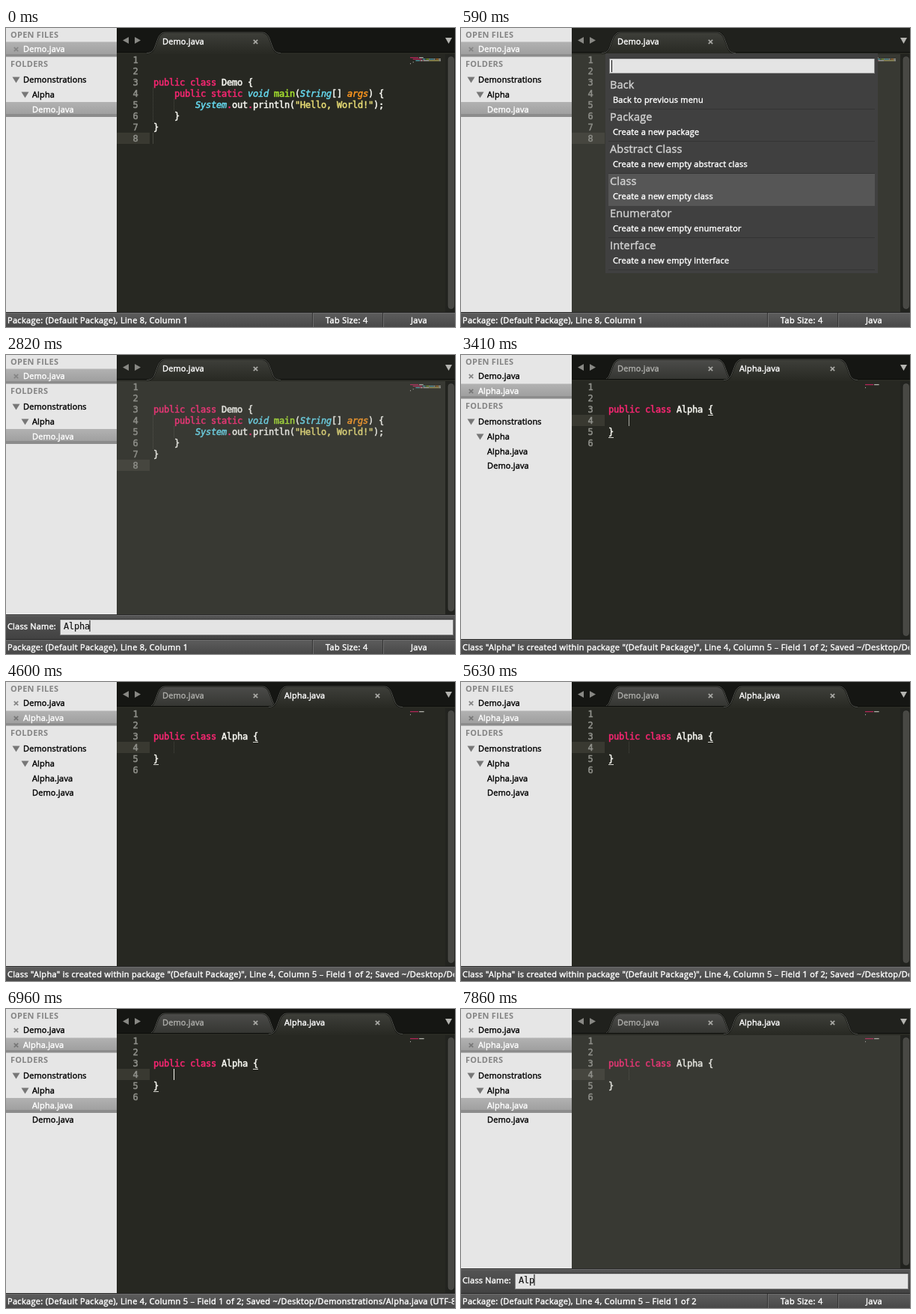
Animation, 600 px wide and 400 px high, one loop 8000 ms. Source, as an HTML page:

```html
<!DOCTYPE html>
<html lang="en">
<head>
<meta charset="utf-8">
<title>Creating a class in an editor</title>
<style>
  html, body { margin: 0; width: 100%; height: 100%; overflow: hidden; background: #272822; }
  svg { display: block; width: 600px; height: 400px; }
  text { white-space: pre; font: 11px "Open Sans", "Noto Sans", sans-serif; letter-spacing: .15px; stroke-width: .42px; }
  .status { letter-spacing: .31px; }
  .desc { letter-spacing: .18px; }
  .head { font-weight: 700; letter-spacing: .25px; stroke-width: 0; }
  .title { font-size: 14.5px; letter-spacing: .17px; }
  .mono { font: 12px "DejaVu Sans Mono", "Liberation Mono", monospace; letter-spacing: -.224px; stroke-width: .15px; }
  .code { stroke-width: .5px; }
  .it { font-style: italic; }
</style>
</head>
<body>
<svg id="stage" viewBox="0 0 600 400" xmlns="http://www.w3.org/2000/svg">
  <defs>
    <linearGradient id="active" x2="0" y2="1">
      <stop stop-color="#3e3f3a"/><stop offset="1" stop-color="#292a24"/>
    </linearGradient>
    <linearGradient id="idle" x2="0" y2="1">
      <stop stop-color="#4c4c4a"/><stop offset="1" stop-color="#343531"/>
    </linearGradient>
    <linearGradient id="row" x2="0" y2="1">
      <stop stop-color="#b2b2b2"/><stop offset=".8" stop-color="#a0a0a0"/>
      <stop offset=".82" stop-color="#8c8c8c"/><stop offset="1" stop-color="#8c8c8c"/>
    </linearGradient>
    <linearGradient id="bar" x2="0" y2="1">
      <stop stop-color="#5e5e5e"/><stop offset="1" stop-color="#484848"/>
    </linearGradient>
    <linearGradient id="panel" x2="0" y2="1">
      <stop stop-color="#545454"/><stop offset="1" stop-color="#434343"/>
    </linearGradient>
    <clipPath id="statusClip"><rect x="0" y="380" width="599" height="20"/></clipPath>
  </defs>
  <g id="scene"></g>
</svg>
<script>
const LOOP = 8000;
const CHAR = 7, LINE = 15, CODE_X = 197, CODE_Y = 35, MINI = .93;

const COLORS = { p: '#f92672', w: '#f8f8f2', c: '#66d9ef', g: '#a6e22e', o: '#fd971f', y: '#e6db74' };

// Each source line is a list of colour:text tokens.
const FILES = {
  Demo: {
    lines: [[], [],
      ['p:public class ', 'w:Demo {'],
      ['w:    ', 'p:public static ', 'c:void ', 'g:main', 'w:(', 'c:String', 'w:[] ', 'o:args', 'w:) {'],
      ['w:        ', 'c:System', 'p:.', 'w:out', 'p:.', 'w:println(', 'y:"Hello, World!"', 'w:);'],
      ['w:    }'], ['w:}'], []],
    guides: [[0, 4, 3], [4, 5, 1]], row: 8, col: 0, marks: []
  },
  Alpha: {
    lines: [[], [], ['p:public class ', 'w:Alpha {'], [], ['w:}'], []],
    guides: [[4, 4, 1]], row: 4, col: 4, marks: [[19, 3], [0, 5]]
  }
};

const MENU = [
  ['Back', 'Back to previous menu'],
  ['Package', 'Create a new package'],
  ['Abstract Class', 'Create a new empty abstract class'],
  ['Class', 'Create a new empty class'],
  ['Enumerator', 'Create a new empty enumerator'],
  ['Interface', 'Create a new empty interface']
];
const FILTERED = [3, 2, 0, 1, 5, 4];

const PACKAGE = 'Package: (Default Package), Line ';
const FIELD = 'Line 4, Column 5 \u2013 Field 1 of 2';
const SAVED = '; Saved ~/Desktop/Demonstrations/Alpha.java (UTF-8)';
const STATUS = {
  demo: PACKAGE + '8, Column 1',
  created: 'Class "Alpha" is created within package "(Default Package)", ' + FIELD + SAVED,
  saved: 'Package: (Default Package), ' + FIELD + SAVED,
  field: 'Package: (Default Package), ' + FIELD
};

// State changes over time; later entries override earlier ones.
const STEPS = [
  [0, { file: 'Demo', focus: true, lit: true, caret: .15, menu: null, input: null,
        inputCaret: 1, status: 'demo', listed: false, selected: 'Demo' }],
  [140, { caret: 0 }],
  [590, { focus: false, lit: false, menu: '' }],
  [1030, { menu: 'c' }],
  [1480, { focus: true, menu: null, caret: 1 }],
  [1630, { focus: false, caret: 0, input: '' }],
  [2070, { input: 'A' }],
  [2220, { input: 'Al' }],
  [2520, { input: 'Alp' }],
  [2670, { input: 'Alph' }],
  [2820, { input: 'Alpha' }],
  [3120, { input: null, file: 'Alpha', focus: true, lit: true, caret: 1, status: 'saved', selected: '' }],
  [3410, { caret: .6, status: 'created', listed: true }],
  [3560, { caret: .2 }],
  [3710, { caret: 0 }],
  [4160, { caret: .5 }],
  [4300, { caret: 1 }],
  [4600, { caret: 0 }],
  [5190, { caret: .4 }],
  [5340, { caret: 1 }],
  [5490, { caret: .5 }],
  [5630, { caret: 0 }],
  [6070, { focus: false, lit: false, menu: '', status: 'saved' }],
  [6520, { menu: 'c' }],
  [6960, { focus: true, lit: true, menu: null, caret: 1, selected: 'Alpha' }],
  [7110, { focus: false, lit: false, caret: 0, input: '', status: 'field' }],
  [7410, { inputCaret: .3 }],
  [7560, { input: 'A', inputCaret: 1 }],
  [7710, { input: 'Al' }],
  [7860, { input: 'Alp' }]
];

const esc = s => s.replace(/&/g, '&amp;').replace(/</g, '&lt;');
const rect = (x, y, w, h, fill, extra = '') =>
  `<rect x="${x}" y="${y}" width="${w}" height="${h}" fill="${fill}" ${extra}/>`;
const text = (x, y, s, fill, cls = '') =>
  `<text x="${x}" y="${y}" fill="${fill}" stroke="${fill}" class="${cls}">${esc(s)}</text>`;
const path = (d, fill, extra = '') => `<path d="${d}" fill="${fill}" ${extra}/>`;
const cross = (x, y, color) =>
  path(`M${x - 2.7} ${y - 2.7}l5.4 5.4m0 -5.4l-5.4 5.4`, 'none', `stroke="${color}" stroke-width="1.7"`);
const code = (x, y, s, fill, cls = '') => text(x, y, s, fill, 'mono code ' + cls);

function tab(x, name, active) {
  const shape = `M${x} 33.5c9 0 10 -6 13 -14c3 -9 5 -13.500 12 -13.500h129c7 0 9 4.500 12 13.500c3 8 4 14 13 14`;
  return path(shape, `url(#${active ? 'active' : 'idle'})`, 'stroke="#0d0e0b" stroke-width="2"') +
    path(shape, 'none', 'stroke="#5c5d58" stroke-width=".9"') +
    text(x + 21, 22, name + '.java', active ? '#fff' : '#adadaa') +
    cross(x + 145.5, 18.5, '#a8a8a4');
}

function tabBar(s) {
  let out = rect(148, 0, 452, 35, s.lit ? '#151613' : '#20211d');
  out += path('M164 12v9l-8 -4.5zM172 12v9l8 -4.5z', '#888884') + path('M587 13h9l-4.5 8z', '#b4b4b0');
  if (s.file === 'Alpha') out += tab(188, 'Demo', false);
  out += rect(148, 32, 452, 1, '#0d0e0b') + rect(148, 33, 452, 2, '#292a24');
  return out + tab(s.file === 'Alpha' ? 351 : 188, s.file, true);
}

function editor(s) {
  const f = FILES[s.file], bottom = s.input === null ? 380 : 347;
  const caretX = CODE_X - 1 + f.col * CHAR, caretY = CODE_Y + (f.row - 1) * LINE;
  let out = rect(148, 35, 452, bottom - 35, '#272822') + rect(148, caretY, 44, LINE, '#393931');
  for (const [col, row, count] of f.guides) {
    const x = CODE_X - .5 + col * CHAR, y = CODE_Y + (row - 1) * LINE;
    out += path(`M${x} ${y}v${count * LINE}`, 'none', 'stroke="#484941" stroke-dasharray="1 1"');
  }
  let mini = '';
  f.lines.forEach((tokens, i) => {
    const y = CODE_Y + 12 + i * LINE;
    out += code(169.5, y, String(i + 1), '#8f908a');
    let col = 0;
    for (const token of tokens) {
      const kind = token[0], str = token.slice(2), ink = str.trim();
      const start = col + str.length - str.trimStart().length;
      if (ink) {
        out += code(CODE_X + start * CHAR, y, ink, COLORS[kind], /[co]/.test(kind) ? 'it' : '');
        mini += rect(540 + start * MINI, 39 + (i - 2) * 2, ink.length * MINI, 1.3, COLORS[kind]);
      }
      col += str.length;
    }
  });
  out += `<g opacity=".65">${mini}</g>`;
  if (s.focus) for (const [col, row] of f.marks)
    out += rect(CODE_X + col * CHAR, CODE_Y + row * LINE, CHAR, 1, '#d8d8d2');
  out += rect(caretX, caretY, 1, LINE, '#f8f8f0', `opacity="${s.caret}"`);
  if (!s.focus) out += rect(148, 35, 439, bottom - 35, '#80817c', 'opacity=".19"');
  return out + rect(587, 35, 13, bottom - 35, '#22231f') +
    rect(591, 38.5, 7.5, bottom - 43, '#484844', 'rx="3.7" stroke="#585854" stroke-width=".6"');
}

function sidebar(s) {
  let out = rect(0, 0, 148, 380, '#e6e6e6');
  const entry = (x, y, label, on) =>
    (on ? rect(0, y - 9.5, 148, 20, 'url(#row)') : '') + text(x, y + 4, label, on ? '#fff' : '#000');
  const arrow = (x, y) => path(`M${x} ${y - 3.5}h10l-5 8z`, '#777');
  const two = s.file === 'Alpha';
  out += text(6, 13, 'OPEN FILES', '#858585', 'head');
  out += entry(23, 28, 'Demo.java', !two) + cross(13.5, 28.5, '#858585');
  if (two) out += entry(23, 48, 'Alpha.java', true) + cross(13.5, 48.5, '#777');
  let y = two ? 68 : 48;
  out += text(6, y + 4, 'FOLDERS', '#858585', 'head');
  out += arrow(8.5, y + 21) + entry(23, y + 21, 'Demonstrations');
  out += arrow(20.5, y + 41) + entry(35, y + 41, 'Alpha');
  y += 60.5;
  if (s.listed) {
    out += entry(35, y, 'Alpha.java', s.selected === 'Alpha');
    y += 19.5;
  }
  return out + entry(35, y, 'Demo.java', s.selected === 'Demo');
}

function field(x, y, w, h) {
  return rect(x, y, w, h, '#e4e4e4', 'stroke="#858585"') + rect(x - .5, y - .5, w + 1, 1, '#3a3a3a') +
    rect(x + .5, y + .5, w - 1, 1, '#bdbdbd');
}

function menu(query) {
  const order = query ? FILTERED : MENU.map((_, i) => i);
  const chosen = query ? 0 : 3;
  let out = rect(193, 34, 364, 294, '#404040') + field(198.5, 40.5, 354, 20);
  out += text(201, 55, query, '#111', 'mono') + rect(201 + query.length * CHAR, 43, 1, 16, '#111');
  order.forEach((id, i) => {
    const y = 66 + i * 43, [name, hint] = MENU[id];
    out += i === chosen ? rect(197, y, 356, 43, '#565656') : rect(197, y + 42, 356, 1, '#343434');
    out += text(199, y + 15, name, '#d2d2d2', 'title') + text(203, y + 34, hint, '#fff', 'desc');
  });
  return out;
}

function inputPanel(s) {
  return rect(0, 347, 600, 33, 'url(#panel)') + rect(0, 347, 600, 1, '#2a2a2a') +
    rect(0, 348, 600, 1, '#6c6c6c') + text(2, 367, 'Class Name:', '#fff', 'desc') +
    field(72.5, 353.5, 525, 21) + text(77, 367, s.input, '#111', 'mono') +
    rect(76.5 + s.input.length * CHAR, 355, 1, 15, '#000', `opacity="${s.inputCaret}"`);
}

function statusBar(s) {
  let out = rect(0, 380, 600, 20, 'url(#bar)') + rect(0, 380, 600, 1, '#262626') + rect(0, 381, 600, 1, '#6c6c6c');
  out += `<g clip-path="url(#statusClip)">${text(2, 395, STATUS[s.status], '#fff', 'status')}</g>`;
  if (s.status === 'demo' || s.status === 'field') {
    for (const x of [409, 503]) out += rect(x, 381, 1, 19, '#353535') + rect(x + 1, 381, 1, 19, '#6d6d6d');
    out += text(427, 395, 'Tab Size: 4', '#fff', 'status') + text(541, 395, 'Java', '#fff', 'status');
  }
  return out;
}

const scene = document.getElementById('scene');
let shown = -1;

function draw(time) {
  const count = STEPS.filter(([at]) => at <= time).length;
  if (count === shown) return;
  shown = count;
  const s = Object.assign({}, ...STEPS.slice(0, count).map(step => step[1]));
  scene.innerHTML = editor(s) + tabBar(s) + sidebar(s) +
    (s.menu === null ? '' : menu(s.menu)) +
    (s.input === null ? '' : inputPanel(s)) + statusBar(s);
}

const begin = performance.now();
function tick() {
  draw((performance.now() - begin) % LOOP);
  requestAnimationFrame(tick);
}
tick();
</script>
</body>
</html>
```
